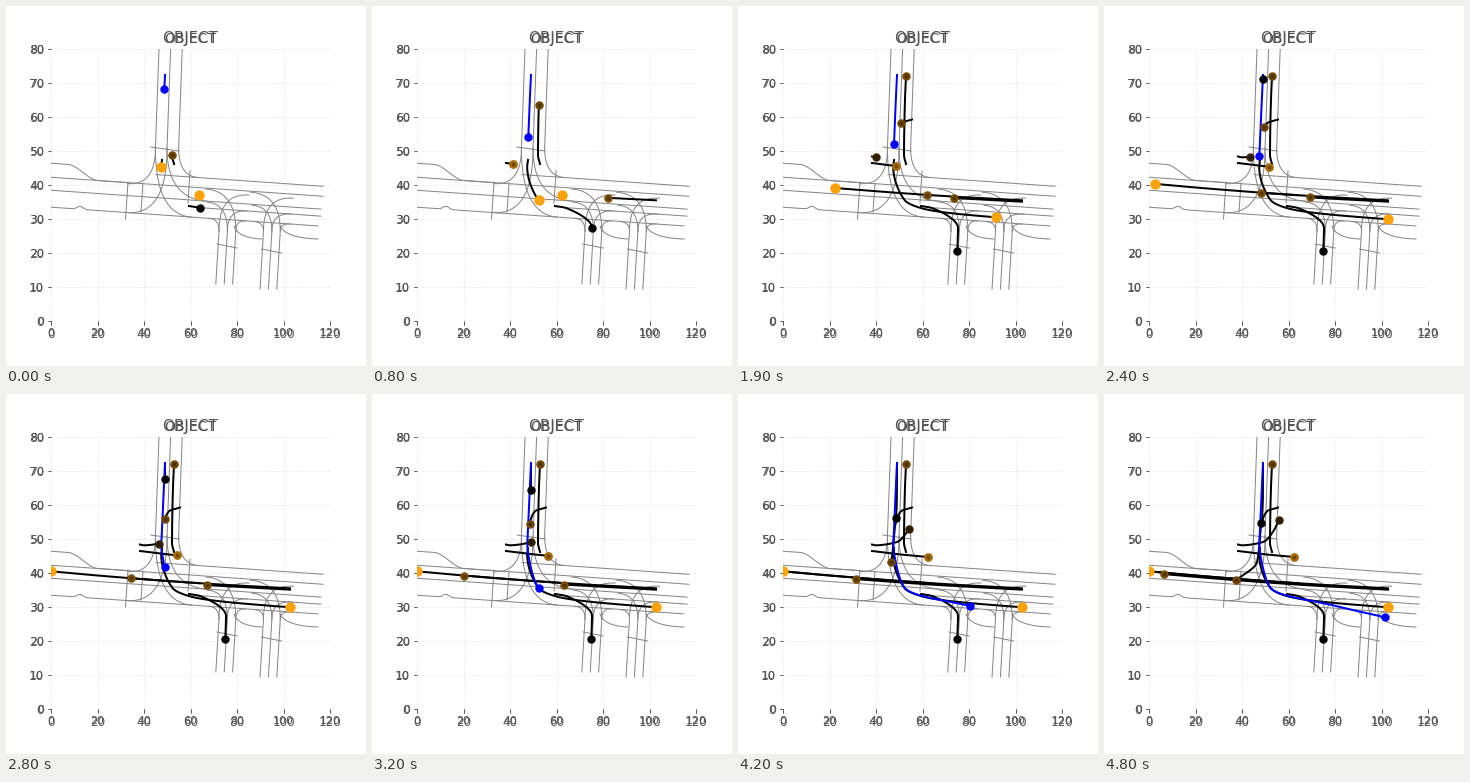
A matplotlib script that plays this animation: 360x360 px, repeating every 4.9 s.

```python
import numpy as np
import matplotlib.pyplot as plt
from matplotlib.animation import FuncAnimation

FRAMES, STEP = 49, 100
SIZE, DPI = 360, 72
GREY = "#555555"
ORANGE = np.array([0.98, 0.635, 0.04])

plt.rcParams["font.family"] = "DejaVu Sans"
fig = plt.figure(figsize=(SIZE / DPI, SIZE / DPI), dpi=DPI, facecolor="white")


def add_axes(label_size, title_size):
    ax = fig.add_axes([0.125, 0.125, 0.775, 0.755], facecolor="none")
    ax.set(xlim=(0, 120), ylim=(0, 80))
    ax.set_title("OBJECT", fontsize=title_size, color=GREY, pad=6)
    ax.tick_params(labelsize=label_size, labelcolor=GREY, color=GREY,
                   length=3.5, width=0.8)
    ax.spines[:].set_visible(False)
    return ax


# two stacked axes give the doubled lettering
add_axes(12, 15)
ax = add_axes(11, 14)
ax.grid(color="#ebebeb", linestyle="--", linewidth=0.8)
ax.set_axisbelow(True)


def to_data(x, y):
    """Stage pixels (y down) to axis units."""
    return (np.asarray(x) - 45) * 120 / 279, (315 - np.asarray(y)) * 80 / 271.8


def monotone(t, v, q):
    """Shape-preserving cubic through (t, v), held at both ends."""
    q = np.clip(q, t[0], t[-1])
    h = np.diff(t)
    d = np.diff(v) / h
    a, b = d[:-1], d[1:]
    inner = [2 * p * r / (p + r) if p * r > 0 else 0 for p, r in zip(a, b)]
    m = np.r_[d[0], inner, d[-1]]
    i = np.clip(np.searchsorted(t, q, side="right") - 1, 0, len(h) - 1)
    u = (q - t[i]) / h[i]
    return ((1 + 2 * u) * (1 - u) ** 2 * v[i] + u * (1 - u) ** 2 * h[i] * m[i]
            + u * u * (3 - 2 * u) * v[i + 1] + u * u * (u - 1) * h[i] * m[i + 1])


# ---- road map ----
def draw_lane(x, y):
    ax.plot(*to_data(x, y), color="#858585", lw=1, zorder=2)


def line(p, q):
    draw_lane(*zip(p, q))


def turn(p, corner, q):
    u = np.linspace(0, 1, 40)[:, None]
    pts = ((1 - u) ** 2 * np.array(p) + 2 * u * (1 - u) * np.array(corner)
           + u ** 2 * np.array(q))
    draw_lane(*pts.T)


def road(x, level):
    """Height of a main-road lane, named by its level at x = 213."""
    return level + 0.07 * (x - 213)


def north(y, i):
    return 153 + 11.6 * i - 0.036 * (y - 43)


# main road, with the widening and the kerb bump in the west
for level, x0, x1 in ((173, 150, 317), (183, 45, 317), (196, 45, 315),
                      (203, 190, 315)):
    line((x0, road(x0, level)), (x1, road(x1, level)))
x = np.linspace(45, 312, 200)
draw_lane(x, road(x, 213) - 3 * np.exp(-((x - 74) / 4) ** 2))
x = np.linspace(45, 122, 80)
u = np.clip((x - 62) / 30, 0, 1)
draw_lane(x, road(x, 183) - 14 * (1 - u * u * (3 - 2 * u)))

# northern arm and its turns
for i in range(3):
    line((north(43, i), 43), (north(142, i), 142))
for i, level, reach in ((0, 184, -28), (1, 213, -40), (0, 213, 36),
                        (1, 196, 40), (2, 173, 20)):
    x0 = north(142, i)
    turn((x0, 142), (x0, road(x0, level)),
         (x0 + reach, road(x0 + reach, level)))
line((145, 141), (173, 145))
line((122, 176), (119.5, 213))
line((137, 177), (135, 206))
line((184, 165), (182, 197))

# southern arms: each lane nests one turn to either side
for base, end in ((213, 278), (257.5, 283)):
    for i in range(3):
        x0 = base + 8.4 * i
        line((x0 - 0.06 * (end - 225), end), (x0, 225))
        for side, n, levels in ((-1, i, (213, 197, 184)),
                                (1, 2 - i, (213, 203, 187))):
            x1 = x0 + side * (10 + 10 * n)
            turn((x0, 225), (x0, road(x0, levels[n])),
                 (x1, road(x1, levels[n])))
    line((base - 2, end - 40), (base + 18, end - 36))
turn((228, 220), (232, 232), (256, 233))
turn((274, 220), (280, 232), (312, 233))


# ---- agents ----
def west_lane(x, shift=0):
    u = x - 45
    return 177.3 + 0.095 * u - 0.0001 * u * u + shift


class Agent:
    """Moves through (step, x, y) keys and leaves its whole path behind."""

    def __init__(self, *keys, warmth=0.0, color=None):
        self.t, self.x, self.y = np.array(keys, float).T
        face = ORANGE * warmth if color is None else color
        core = face if warmth in (0, 1) else ORANGE * warmth * 0.68
        size = 8.4 + 2 * warmth ** 4
        z = 5 if color else 4 + warmth / 2
        self.trail, = ax.plot([], [], color=color or "black", lw=2, zorder=z)
        self.dots = [ax.plot([], [], "o", ms=ms, mew=0, color=c, zorder=z + 3)[0]
                     for ms, c in ((size, face), (4, core))]

    def draw(self, k):
        x, y = [], []
        if k >= self.t[0]:
            q = np.linspace(self.t[0], k, int((k - self.t[0]) * 8) + 2)
            x, y = to_data(monotone(self.t, self.x, q),
                           monotone(self.t, self.y, q))
        self.trail.set_data(x, y)
        for dot in self.dots:
            dot.set_data(x[-1:], y[-1:])


def queue_car(*keys, warmth, shift=0):
    """Westbound car: only its progress along the lane is keyed."""
    return Agent(*((k, x, west_lane(x, shift)) for k, x in keys), warmth=warmth)


agents = [
    # northbound
    Agent((-1.5, 168, 158), (0, 166, 149), (8, 166.8, 99), (18, 168, 70.5),
          warmth=0.45),
    # westbound queue
    queue_car((1.5, 284), (8, 236), (19, 189), (24, 157), (32, 92), (38, 45),
              warmth=0.5),
    queue_car((10.5, 284), (19, 216), (32, 192), (42, 117.5), (48, 60),
              warmth=0.48, shift=1.4),
    queue_car((-1, 193.5), (8, 190), (12, 170), (19, 97), (24.7, 45),
              warmth=1),
    # on foot
    Agent((3.5, 134, 157), (19, 158, 160), (42, 190, 163), warmth=0.67),
    Agent((15.5, 134, 150.5), (19, 138, 151.3), (32, 159, 148),
          (42, 170.5, 135.3), (48, 174.5, 126.3), warmth=0.22),
    # pulls out and turns west
    Agent((12.5, 174, 113.5), (19, 163, 117.3), (32, 157.5, 130),
          (42, 153, 168), (48, 132, 186.3), warmth=0.45),
    # turns south
    Agent((-1.5, 183, 200), (0, 194, 202), (8, 220, 222), (15, 219.3, 245.3)),
    # follows from the north
    Agent((22.5, 159, 69), (32, 159, 96), (42, 158, 124.5), (48, 157, 129)),
    # turns east
    Agent((-1.5, 156, 154), (0, 155.2, 161), (8, 166.5, 194), (12, 191, 204),
          (19, 258, 211.3), (24, 283.7, 213.2), warmth=1),
    # tracked object
    Agent((-2, 159, 69), (0, 158.3, 83), (8, 156.3, 131), (19, 156, 138.3),
          (24, 155.3, 150.3), (32, 166.7, 194), (42, 232, 212),
          (48, 281, 223.3), color="blue"),
]


def update(k):
    for agent in agents:
        agent.draw(k)
    return []


anim = FuncAnimation(fig, update, frames=FRAMES, interval=STEP, repeat=True,
                     repeat_delay=0, init_func=lambda: update(0))
plt.show()
```
